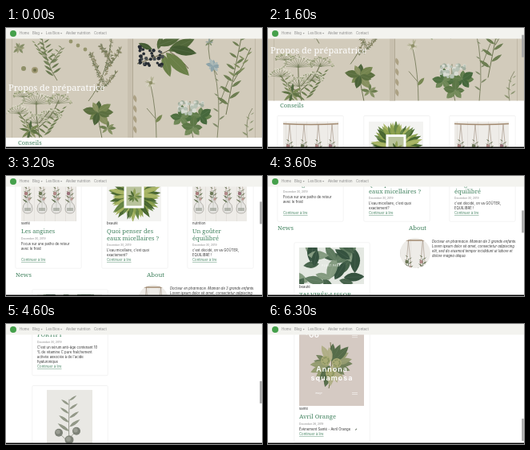
An HTML page for the animation above (6400 ms loop, 320 by 151 pixels).

```html
<!DOCTYPE html>
<html lang="fr">
<head>
<meta charset="utf-8">
<title>Blog santé</title>
<style>
html, body { margin: 0; width: 100%; height: 100%; overflow: hidden; background: #fff; }
body > svg { display: block; width: 100vw; height: 100vh; }
text { font: 4.25px Inter, sans-serif; fill: #333; white-space: pre; }
.title { font: 7.6px "Noto Serif", serif; fill: #438360; }
.hero { font: 11px "Noto Serif", serif; fill: #fff; }
.date { font-size: 3.3px; fill: #888; }
.link { fill: #438360; text-decoration: underline; text-decoration-thickness: .3px; }
.nav { font-size: 4.25px; fill: #858585; }
.about { font-style: italic; }
.label { font-weight: 600; font-size: 9px; letter-spacing: 1px; fill: #fff; text-anchor: middle; }
.small { font-size: 3px; fill: #fff; }
.card { fill: #fff; stroke: #f0f0f0; stroke-width: .4; filter: drop-shadow(0 .8px .6px #0002); }
</style>
</head>
<body>
<svg id="stage" viewBox="0 0 320 151" preserveAspectRatio="none"></svg>
<script>
let seed = 7;
const rnd = () => (seed = seed * 16807 % 2147483647) / 2147483647;
const times = (n, f) => Array.from({length: n}, (_, i) => f(i)).join('');
const rect = (x, y, w, h, fill, more = '') =>
  `<rect x="${x}" y="${y}" width="${w}" height="${h}" fill="${fill}" ${more}/>`;
const dot = (x, y, r, fill) => `<circle cx="${x}" cy="${y}" r="${r}" fill="${fill}"/>`;
const line = (d, color, w = .6) => `<path d="${d}" fill="none" stroke="${color}" stroke-width="${w}"/>`;
const leaf = (x, y, len, angle, fill, fat = .35) =>
  `<g transform="translate(${x} ${y}) rotate(${angle})"><path d="M0 0Q${len * .45} ${-len * fat} ${len} 0Q${len * .45} ${len * fat} 0 0" fill="${fill}"/><path d="M0 0H${len}" stroke="#fff3" stroke-width=".3"/></g>`;
const text = (x, mid, s, cls = '') => {
  const drop = {title: 2.6, hero: 3.6, label: 3.2}[cls] || 1.4;
  return `<text x="${x}" y="${mid + drop}" class="${cls}">${s}</text>`;
};
const lines = (x, mid, list, step, cls) => list.map((s, i) => text(x, mid + i * step, s, cls)).join('');
const clip = (x, y, w, h, body, box = `0 0 ${w} ${h}`) =>
  `<svg x="${x}" y="${y}" width="${w}" height="${h}" viewBox="${box}">${body}</svg>`;

// Leaves radiating around a centre
const bunch = (x, y, n, len, colors, hole = 0, fat) => times(n, i => {
  const a = i * 137.5, r = a * Math.PI / 180;
  return leaf(x + hole * Math.cos(r), y + hole * Math.sin(r), len * (.65 + .35 * rnd()), a, colors[i % colors.length], fat);
});
// Flower head made of rays ending in clusters of dots
const umbel = (x, y, r, n, color) => times(n, i => {
  const a = Math.PI * (1 + (i + .5) / n), px = x + r * Math.cos(a), py = y + r * .75 * Math.sin(a);
  return line(`M${x} ${y}L${px} ${py}`, '#737d58', .5)
    + times(6, () => dot(px + (rnd() - .5) * r * .35, py + (rnd() - .5) * r * .25, .8, rnd() < .6 ? color : '#8b936f'));
});
const stemLeaves = (x, y, dx, dy, n, len, color, fat = .22) => times(n, i => {
  const k = (i + .5) / n, side = i % 2 ? -35 : 215;
  return leaf(x + dx * k, y + dy * k, len * (1 - k * .4), side, color, fat);
});

const greens = ['#5b6f3f', '#75854f', '#4b6238', '#87905f'];

function herbarium() {
  const stem = '#6f7553', paper = '#d2cbbb';
  return rect(0, 13, 320, 126, paper) + rect(152, 13, 6, 126, '#c8c0af') + rect(158, 13, 1, 126, '#b1a995')
    + rect(7, 13, .7, 126, '#bbb3a1') + rect(311, 13, .7, 126, '#b9b19f')
    // left umbels
    + line('M42 139Q37 110 38 92M41 125Q58 112 66 91M40 129Q20 116 16 106M41 120Q52 108 54 104', stem, 1.1)
    + stemLeaves(45, 139, 26, -38, 14, 12, '#68784b') + stemLeaves(34, 139, -17, -34, 12, 11, '#758256')
    + umbel(38, 96, 18, 13, '#e2dfcf') + umbel(66, 95, 14, 10, '#b8bb9a') + umbel(16, 108, 13, 10, '#dedbc9')
    + umbel(55, 113, 13, 10, '#d8d7c2') + umbel(21, 87, 10, 9, '#c0c2a1') + umbel(38, 120, 14, 9, '#c9cab0')
    + bunch(30, 129, 9, 14, greens, 0, .25)
    // top left sprigs and details
    + line('M64 66Q50 45 45 13M54 47L70 25M51 38L36 20', stem, .9)
    + stemLeaves(60, 62, -14, -48, 15, 13, '#65744b') + stemLeaves(55, 48, 16, -24, 9, 10, '#78845a')
    + stemLeaves(48, 36, -12, -18, 7, 9, '#718051')
    + bunch(16, 25, 9, 9, ['#9a9c76', '#818a62']) + dot(36, 53, 4, '#a19a75') + dot(22, 51, 3, '#8f9069')
    + dot(36, 53, 2, '#6e7049') + times(3, i => dot(81 + i * 9, 17 + i * 5, 2.4, '#96956d'))
    // panicle
    + line('M103 92Q125 64 132 13M120 66Q108 45 105 30M125 50Q139 39 143 26M128 37L118 22M113 80Q128 73 137 57', stem, .9)
    + times(270, i => {
        const k = i % 54 / 54, b = i % 5;
        const x = [132 - 20 * k * k, 106 + 13 * k, 143 - 17 * k, 118 + 10 * k, 137 - 21 * k][b];
        const y = [14 + 67 * k, 31 + 33 * k, 27 + 23 * k, 22 + 15 * k, 57 + 22 * k][b];
        return leaf(x, y, 2.5 + 2.5 * rnd(), rnd() * 360, rnd() < .5 ? '#837f5c' : '#6a704e', .3);
      })
    // rosette
    + line('M120 139Q116 120 113 98', stem, 1) + bunch(115, 106, 9, 21, greens, 0, .5)
    + bunch(127, 126, 6, 12, ['#687a49', '#838f60'])
    // seed pods by the fold
    + times(4, i => leaf(160, 84 + i * 13, 10, 75, '#a99e80', .4))
    // berries
    + line('M164 45Q190 37 231 13M187 38L175 20M205 30Q218 38 228 51', '#5f5a3c', 1)
    + [[203, 29, 36, -25], [200, 31, 41, 45], [205, 25, 34, 12], [190, 27, 19, -75], [196, 33, 30, 72], [183, 27, 19, 205], [190, 22, 30, -20]]
        .map(([x, y, l, a], i) => leaf(x, y, l, a, ['#52683a', '#6a7f47', '#435b32'][i % 3])).join('')
    + times(36, () => dot(165 + rnd() * 31, 23 + rnd() * 26, 1.6 + rnd() * .8, rnd() < .7 ? '#252b32' : '#494e50'))
    // thin umbel
    + line('M188 139Q188 105 181 72M187 114L176 101', stem, .8)
    + bunch(181, 69, 16, 9, ['#a9a985', '#d5d1be'], 0, .2) + dot(181, 69, 2.3, '#8e8f68') + leaf(187, 119, 13, -50, greens[1])
    // white blossoms
    + line('M234 139Q229 119 230 92', stem, .9)
    + bunch(219, 113, 6, 18, ['#4f7040', '#6e8756'], 0, .6) + bunch(243, 111, 6, 16, ['#617d4b', '#46683c'], 0, .6)
    + bunch(234, 125, 5, 15, ['#5c7746', '#738a59'], 0, .6)
    + times(42, () => dot(216 + rnd() * 30, 91 + rnd() * 17, 1.4 + rnd() * 1.5, ['#d9dcd3', '#b8c3b6', '#a0ad9d'][Math.floor(rnd() * 3)]))
    // blue flower
    + line('M264 139Q270 90 259 48M268 92L278 66M264 59Q250 40 254 13', stem, .8)
    + bunch(259, 47, 9, 10, ['#8ba1a7', '#a9b7b5'], 0, .5) + stemLeaves(266, 130, 0, -68, 7, 10, '#7a8561')
    + bunch(254, 18, 6, 7, ['#8d9d97', '#7a8965'])
    // tall right stem
    + line('M275 109Q284 62 294 13M284 68Q297 48 306 25', stem, 1)
    + stemLeaves(277, 100, 17, -88, 12, 17, '#697a4d', .25) + stemLeaves(286, 64, 19, -38, 7, 12, '#7b8858')
    + line('M302 139Q298 115 308 101', stem, .7) + stemLeaves(302, 138, 4, -31, 6, 9, '#87906a');
}

// Hanging bottles on pale boards
const flasks = () => rect(0, 0, 69, 66, '#eeece8')
  + times(6, i => rect(i * 13 + 3, 0, .5, 66, '#dad6d0'))
  + line('M0 3Q35 5 69 3', '#a28a70', 1.5)
  + [8, 26, 44, 61].map((x, i) =>
      line(`M${x} 4L${x - 3} 37M${x} 4L${x + 3} 37`, '#8e7b68', .5)
      + line(`M${x} 53V27`, '#59664a', .7)
      + `<path d="M${x - 2} 36h4v6q4 3 4 8q0 6 -6 6q-6 0 -6 -6q0 -5 4 -8z" fill="#e2e2dfbb" stroke="#908d86" stroke-width=".6"/>`
      + rect(x - 4, 49, 8, 4, '#9ca197aa')
      + stemLeaves(x, 44, 0, -20, 7, 8, ['#596b48', '#737c60'][i % 2])
      + dot(x - 2, 31, 2.2, ['#a97c7c', '#6d7858', '#b18987', '#9a707a'][i]) + dot(x + 2, 38, 1.7, '#bb9993')).join('');

const framed = () => rect(0, 0, 68, 66, '#f3f3f1')
  + bunch(34, 33, 60, 29, ['#648343', '#8a9f4c', '#47652f', '#a6b362'], 6, .22)
  + rect(23, 18, 22, 30, '#b9c39c', 'stroke="#fff" stroke-width="3"')
  + bunch(34, 35, 10, 11, ['#64803f', '#48652f', '#8fa054'], 0, .3);

const foliage = () => rect(0, 0, 81, 46, '#e4e8e2')
  + times(25, i => leaf(4 + rnd() * 72, 2 + rnd() * 42, 18 + rnd() * 13, rnd() * 360, ['#46634b', '#5f7b60', '#35523f', '#849b80'][i % 4], .42))
  + `<text x="40" y="23.5" class="small" text-anchor="middle" letter-spacing=".5">PLANT PART</text>`;

const fruits = () => rect(0, 0, 57, 88, '#e9e8e4')
  + line('M28 80Q27 45 28 12M28 67L15 54M28 61L37 52', '#777a6d', .7)
  + stemLeaves(28, 55, 0, -44, 8, 18, '#8f9584')
  + [[15, 54, 5], [37, 52, 5], [28, 63, 5.5]].map(([x, y, r]) => dot(x, y, r, '#7e8278') + dot(x - 1, y - 1, r * .55, '#9b9e94')).join('');

const poster = () => rect(0, 0, 81, 106, '#d5cac3')
  + text(8, 16, 'N°', 'small') + `<text x="12" y="20" style="font-size:10px;font-weight:600;fill:#fff">06</text>`
  + times(3, i => rect(66, 15 + i * 2.3, 7, .5, '#fff'))
  + line('M37 84Q43 58 39 26', '#777551', 1)
  + bunch(40, 53, 20, 28, ['#72805a', '#949b70', '#566c49', '#b0ae86'], 3)
  + [[33, 49], [47, 52], [39, 65]].map(([x, y]) => dot(x, y, 6, '#a8aa75')
      + times(9, i => dot(x + 3.8 * Math.cos(i * 2.4), y + 3.8 * Math.sin(i * 2.4), 1, '#86905f'))).join('')
  + text(41, 60, 'Annona', 'label') + text(41, 71, 'squamosa', 'label')
  + text(20, 90, 'image', 'small') + times(2, i => rect(66, 89 + i * 2.3, 7, .5, '#fff'));

const card = (x, top, w, bottom) => `<rect class="card" x="${x}" y="${top}" width="${w}" height="${bottom - top}" rx="1"/>`;
const post = (x, y, tag, title, body, linkY) => {
  const dateY = y + 19 + (title.length - 1) * 8;
  return text(x, y, tag) + lines(x, y + 9.5, title, 8.4, 'title') + text(x, dateY, body[0], 'date')
    + lines(x, dateY + 7, body.slice(1), 6) + text(x, linkY, 'Continuer à lire', 'link');
};

const page = clip(0, 13, 320, 125, herbarium(), '0 13 320 125')
  + text(3, 75, 'Propos de préparatrice', 'hero')
  + text(15, 144, 'Conseils', 'title')
  + [12, 120, 227].map(x => card(x, 157, 82, 289)).join('')
  + clip(19, 164, 69, 66, flasks()) + clip(126, 164, 68, 66, framed()) + clip(233, 164, 68, 66, flasks())
  + post(19, 233, 'santé', ['Les angines'], ['December 30, 2019', 'Focus sur une patho de retour', 'avec le froid'], 279)
  + post(126, 233, 'beauté', ['Quoi penser des', 'eaux micellaires ?'], ['December 30, 2019', "L'eau micellaire, c'est quoi", 'exactement?'], 279)
  + post(233, 233, 'nutrition', ['Un goûter', 'équilibré'], ['December 30, 2019', "c'est décidé, on va GOÛTER,", 'EQUILIBRÉ !'], 279)
  + text(12, 297, 'News', 'title') + text(176, 297, 'About', 'title')
  + '<clipPath id="round"><circle cx="184" cy="329" r="19"/></clipPath>'
  + `<g clip-path="url(#round)">${clip(149.5, 309, 69, 66, flasks())}</g>`
  + lines(205, 315, ['Docteur en pharmacie. Maman de 3 grands enfants.', 'Lorem ipsum dolor sit amet, consectetur adipiscing',
      'elit, sed do eiusmod tempor incididunt ut labore et', 'dolore magna aliqua.'], 6, 'about')
  + card(33, 316, 94, 449) + card(33, 462, 94, 616) + card(33, 629, 94, 786)
  + clip(39, 322, 81, 46, foliage()) + clip(51, 467, 57, 88, fruits()) + clip(39, 634, 81, 106, poster())
  + post(39, 371.5, 'beauté', ['TALVIRÉE-LISSOR', 'COMPLEXE B', 'FORTIFY'], ['December 30, 2019',
      "C'est un sérum anti-âge contenant 10", '% de vitamine C pure fraîchement', "activée associée à de l'acide", 'hyaluronique'], 438)
  + post(39, 567, 'nutrition', ['La mirvel'], ['December 30, 2019', 'J-9 avant le réveillon, on adopte toutes', 'la MIRVEL !!'], 605)
  + post(39, 743.5, 'santé', ['Avril Orange'], ['December 26, 2019', 'Évènement Santé - Avril Orange'], 776)
  + leaf(109, 771, 3.5, -50, '#4c5a47');

const caret = x => `<path d="M${x} 6.3h2.2l-1.1 1.2z" fill="#858585"/>`;
const nav = rect(0, 0, 320, 13.5, '#f3f3ef') + dot(9, 7, 4, '#45a04b')
  + [[17, 'Home'], [33, 'Blog'], [50, 'Les Bios'], [75, 'Atelier nutrition'], [110, 'Contact']]
      .map(([x, s]) => text(x, 6.8, s, 'nav')).join('') + caret(43.5) + caret(68);

stage.innerHTML = rect(0, 0, 320, 151, '#fff') + `<g id="page">${page}</g>` + nav
  + rect(317.3, 0, 2.4, 28, '#a3a3a3', 'id="thumb"') + rect(0, 149.6, 320, 1.4, '#000');

const pageEl = document.getElementById('page'), thumbEl = document.getElementById('thumb');
// Time and scroll offset
const path = [[0, 0], [800, 0], [1100, 5], [1400, 28], [2200, 102], [2800, 149], [3200, 173], [3600, 232], [4000, 295],
  [4100, 295], [4800, 420], [5200, 420], [5500, 513], [5700, 555], [5800, 555], [6300, 637], [6400, 637]];
const scrollAt = t => {
  const i = path.findIndex(p => p[0] > t), [t0, y0] = path[i - 1], [t1, y1] = path[i];
  return y0 + (y1 - y0) * (t - t0) / (t1 - t0);
};

const start = performance.now();
function draw() {
  const t = Math.floor(Math.max(0, performance.now() - start) % 6400 / 100) * 100;
  const y = scrollAt(t);
  pageEl.setAttribute('transform', `translate(0 ${-y})`);
  thumbEl.setAttribute('y', y * .187);
  thumbEl.setAttribute('opacity', t < 800 ? 0 : 1); // appears with the first scroll
  requestAnimationFrame(draw);
}
draw();
</script>
</body>
</html>
```
